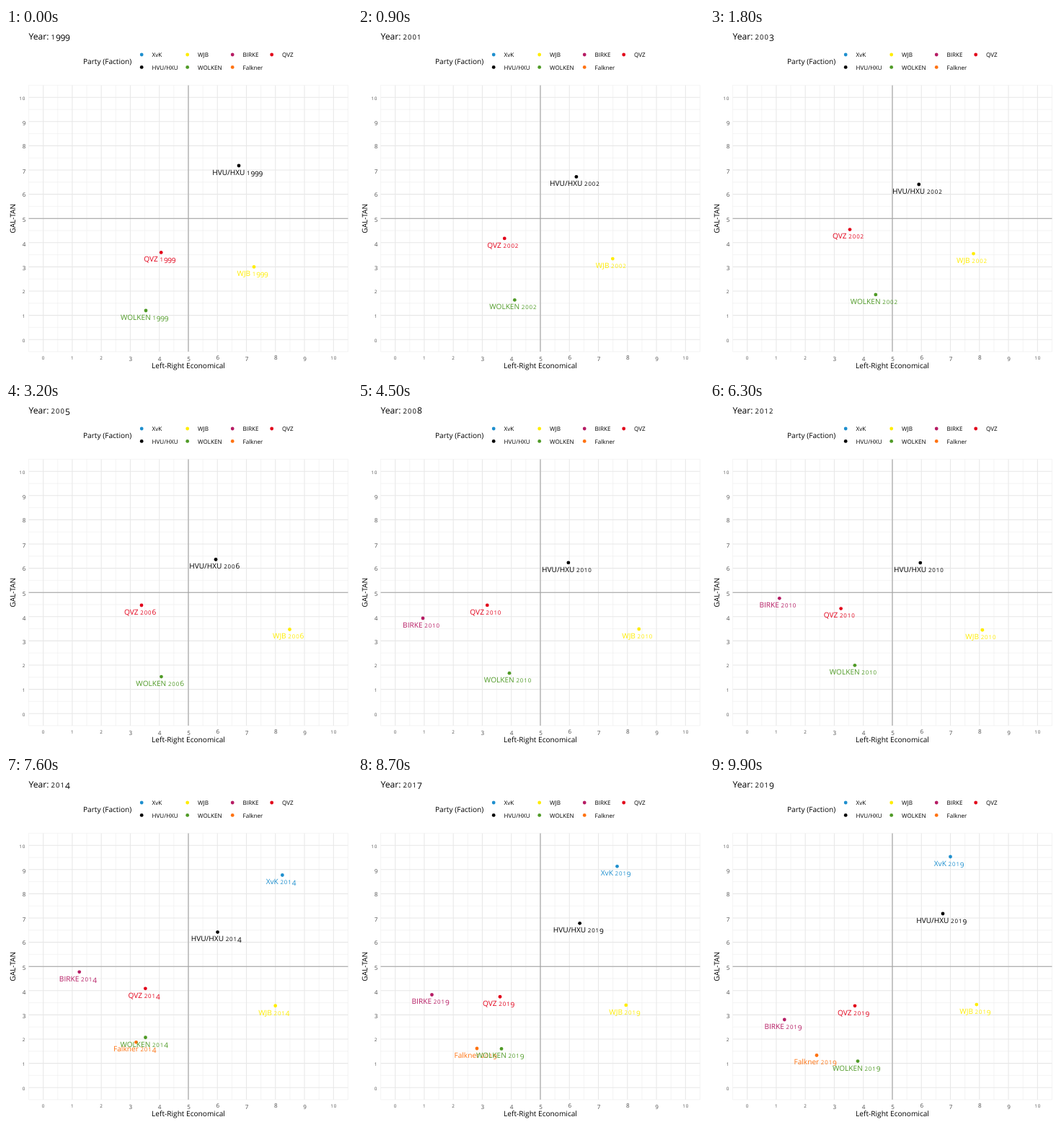
These frames come from a looping animation (480x480 px, 10 s). An HTML page:

```html
<!DOCTYPE html>
<html lang="en">
<head>
<meta charset="utf-8">
<title>Party positions</title>
<style>
  html, body { margin: 0; width: 100%; height: 100%; overflow: hidden; background: #fff; }
  svg { display: block; width: 480px; height: 480px; }
  text { font-family: "Open Sans", "Noto Sans", sans-serif; text-rendering: geometricPrecision; }
  /* text figures: 0-2 at x-height, most others hang below the baseline */
  .low { font-size: .78em; letter-spacing: .114em; }
  .tall { letter-spacing: -.037em; }
</style>
</head>
<body>
<svg id="stage" viewBox="0 0 480 480" xmlns="http://www.w3.org/2000/svg">
  <g id="chart"></g>
  <g id="dots"></g>
  <g id="tags"></g>
  <text id="year" x="31.5" y="15.6" font-size="12.14"></text>
</svg>
<script>
const FRAMES = 100, STEP = 100;
const SMALL = 8.1, BODY = 10.13;
const YEARS = [1999, 2002, 2006, 2010, 2014, 2019];
const KEYS = YEARS.map(y => Math.round((y - 1999) / 20 * (FRAMES - 1)));

// path: one point for each survey year, starting at YEARS[from]
const parties = [
  { name: "Falkner", color: "#ff7210", from: 4, path: [[183.4, 367.7], [148, 387.5]] },
  { name: "HVU/HXU", color: "#000000", from: 0, path: [[323, 191], [289.5, 216.7], [291.3, 218.8], [292.4, 226.6], [291, 218.8], [323, 191]] },
  { name: "QVZ", color: "#e2001a", from: 0, path: [[215.2, 311.4], [195.3, 279], [186.7, 282.5], [172.6, 281.5], [192.7, 292.7], [201, 318.8]] },
  { name: "WJB", color: "#ffed00", from: 0, path: [[344, 331.4], [359.5, 312.5], [399.5, 316], [381, 314.1], [374, 318.9], [369.8, 317.1]] },
  { name: "WOLKEN", color: "#4f9a26", from: 0, path: [[194, 392], [232.9, 367.6], [212.4, 383.4], [207.8, 369.7], [192.5, 359.9], [205, 395.6]] },
  { name: "BIRKE", color: "#b61c64", from: 2, path: [[87.8, 325.1], [92, 277.4], [101.6, 266.1], [103.3, 338]] },
  { name: "XvK", color: "#1e8fce", from: 4, path: [[387.7, 139.7], [333.5, 112]] }
];
const legend = [
  ["XvK", 188.2, 0], ["HVU/HXU", 188.2, 1], ["WJB", 251.7, 0], ["WOLKEN", 251.7, 1],
  ["BIRKE", 314.2, 0], ["Falkner", 314.2, 1], ["QVZ", 368.7, 0]
];

const el = id => document.getElementById(id);
const px = v => 51.64 + 40.27 * v;
const py = v => 432.2 - 33.6 * v;

function figures(s) {
  let shift = 0;
  return s.replace(/\D+|\d/g, run => {
    const drop = /[34579]/.test(run) ? 0.18 : 0;
    const dy = (drop - shift).toFixed(2);
    const kind = /[012]/.test(run) ? "low" : /\d/.test(run) ? "tall" : "";
    // dy is in em of the run itself
    const scale = kind === "low" ? 0.78 : 1;
    shift = drop;
    return `<tspan xml:space="preserve" class="${kind}" dy="${(dy / scale).toFixed(3)}em">${run}</tspan>`;
  });
}

function text(s, x, y, size, fill = "#000", anchor = "start", extra = "") {
  return `<text x="${x}" y="${y}" font-size="${size}" fill="${fill}" text-anchor="${anchor}" ${extra}>${figures(s)}</text>`;
}

function dot(x, y, fill) {
  return `<circle cx="${x}" cy="${y}" r="2.4" fill="${fill}"/>`;
}

function cross(v, color, width) {
  const x = px(v), y = py(v);
  return `<path d="M31.5 ${y}H474.5M${x} 79.4V449" fill="none" stroke="${color}" stroke-width="${width}"/>`;
}

function drawChart() {
  let out = "";
  for (let v = -0.5; v <= 10.5; v++) out += cross(v, "#ebebeb", 0.53);
  for (let v = 0; v <= 10; v++) out += cross(v, "#e8e8e8", 1.07);
  out += cross(5, "#a0a0a0", 1.07);
  for (let v = 0; v <= 10; v++) {
    out += text(String(v), px(v) + 0.3, 460.3, SMALL, "#4d4d4d", "middle");
    out += text(String(v), 27, py(v) + 3.3, SMALL, "#4d4d4d", "end");
  }
  out += text("Left-Right Economical", 253, 472, BODY, "#000", "middle");
  out += text("GAL-TAN", 0, 0, BODY, "#000", "middle", 'transform="translate(13.2 264.3) rotate(-90)"');
  out += text("Party (Faction)", 107, 50, BODY);
  for (const [name, x, row] of legend) {
    const y = 37 + 17.4 * row;
    out += dot(x, y, parties.find(p => p.name === name).color);
    out += text(name, x + 14.3, y + 3.1, SMALL);
  }
  el("chart").innerHTML = out;
}

function drawFrame(n) {
  let i = 0;
  while (i < KEYS.length - 2 && n >= KEYS[i + 1]) i++;
  const u = (n - KEYS[i]) / (KEYS[i + 1] - KEYS[i]);
  const survey = YEARS[u < 0.5 ? i : i + 1];
  let dots = "", tags = "";
  for (const { name, color, from, path } of parties) {
    if (i < from) continue;
    const a = path[i - from], b = path[i - from + 1];
    const x = a[0] + (b[0] - a[0]) * u;
    const y = a[1] + (b[1] - a[1]) * u;
    dots += dot(x, y, color);
    tags += text(`${name} ${survey}`, x - 2, y + 12.9, BODY, color, "middle");
  }
  el("dots").innerHTML = dots;
  el("tags").innerHTML = tags;
  el("year").innerHTML = figures("Year: " + Math.round(1999 + 20 * n / (FRAMES - 1)));
}

let shown = -1;
function tick(now) {
  const n = Math.floor(now / STEP) % FRAMES;
  if (n !== shown) drawFrame(shown = n);
  requestAnimationFrame(tick);
}

drawChart();
drawFrame(0);
requestAnimationFrame(tick);
</script>
</body>
</html>
```
